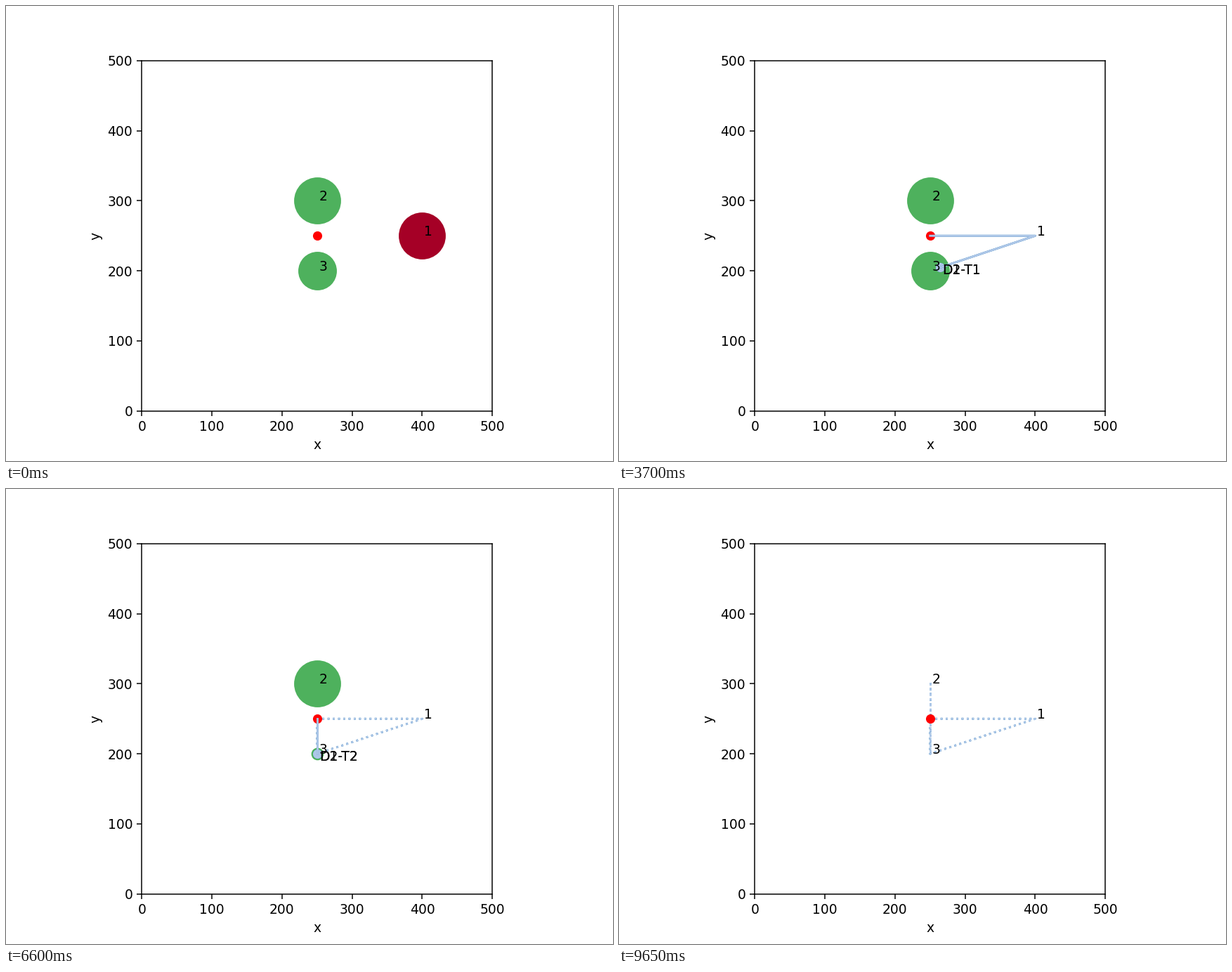
Animation, 864 px wide and 648 px high, one loop 10 s. Source, as a matplotlib script:

```python
import numpy as np
import matplotlib.pyplot as plt
from matplotlib.animation import FuncAnimation

FRAMES, INTERVAL = 200, 50
SPEED = 8.8          # map units per frame
SERVICE = 1.356      # frames needed per unit of demand
SIZE = 40            # marker area per unit of demand

DEPOT = np.array([250.0, 250.0])
TARGETS = {1: (400, 250), 2: (250, 300), 3: (250, 200)}
DEMAND = {1: 30, 2: 30, 3: 20}
SHADE = {1: 0.0, 2: 0.83, 3: 0.83}

# start time, stops as (target, units delivered)
TRIPS = [(0.0, [(1, 30), (3, 10)]),
         (115.18, [(3, 10), (2, 30)])]


def schedule(start, stops):
    """Timed waypoints of a trip and its deliveries."""
    times, points, drops = [start], [DEPOT], []
    for target, units in stops + [(None, 0)]:
        goal = DEPOT if target is None else np.array(TARGETS[target], float)
        arrive = times[-1] + np.hypot(*(goal - points[-1])) / SPEED
        times.append(arrive)
        points.append(goal)
        if units:
            leave = arrive + units * SERVICE
            times.append(leave)
            points.append(goal)
            drops.append((target, units, arrive, leave))
    return np.array(times), np.array(points), drops


PLANS = [schedule(*trip) for trip in TRIPS]


def remaining(target, t):
    left = DEMAND[target]
    for _, _, drops in PLANS:
        for stop, units, arrive, leave in drops:
            if stop == target:
                left -= units * np.clip((t - arrive) / (leave - arrive), 0, 1)
    return left


def position(times, points, t):
    return np.array([np.interp(t, times, points[:, k]) for k in (0, 1)])


fig, ax = plt.subplots(figsize=(6.4, 4.8), dpi=135)
ax.set(xlim=(0, 500), ylim=(0, 500), xlabel="x", ylabel="y")
ax.set_aspect("equal", adjustable="box")

circles = {}
for n, (x, y) in TARGETS.items():
    circles[n] = ax.scatter(x, y, s=SIZE * DEMAND[n],
                            color=plt.cm.RdYlGn(SHADE[n]))
    ax.text(x + 3, y, str(n))
ax.plot(*DEPOT, "ro")

drones = []
for d in range(2):
    color = plt.cm.tab20(d)
    drones.append({
        "dot": ax.scatter(*DEPOT, color=color),
        "path": ax.plot([], [], color=color)[0],
        "label": ax.text(0, 0, ""),
        "trails": [ax.plot(points[:, 0], points[:, 1], ":", color=color,
                           zorder=0)[0] for _, points, _ in PLANS],
    })


def update(t):
    for n, circle in circles.items():
        left = remaining(n, t)
        circle.set_sizes([SIZE * max(left, 0)])
        circle.set_visible(left > 1e-6)

    active = next((k for k, (times, _, _) in enumerate(PLANS)
                   if times[0] < t < times[-1]), None)
    for d, drone in enumerate(drones, 1):
        for trail, (times, _, _) in zip(drone["trails"], PLANS):
            trail.set_visible(t >= times[-1])
        for part in ("dot", "path", "label"):
            drone[part].set_visible(active is not None)
        if active is None:
            continue
        times, points, _ = PLANS[active]
        here = position(times, points, t)
        route = np.vstack([points[times <= t], here])
        drone["dot"].set_offsets([here])
        drone["path"].set_data(route[:, 0], route[:, 1])
        drone["label"].set_position(here + (3, -10))
        drone["label"].set_text(f"D{d}-T{active + 1}")
    return []


anim = FuncAnimation(fig, update, frames=FRAMES, interval=INTERVAL,
                     repeat=True, repeat_delay=0)
plt.show()
```
